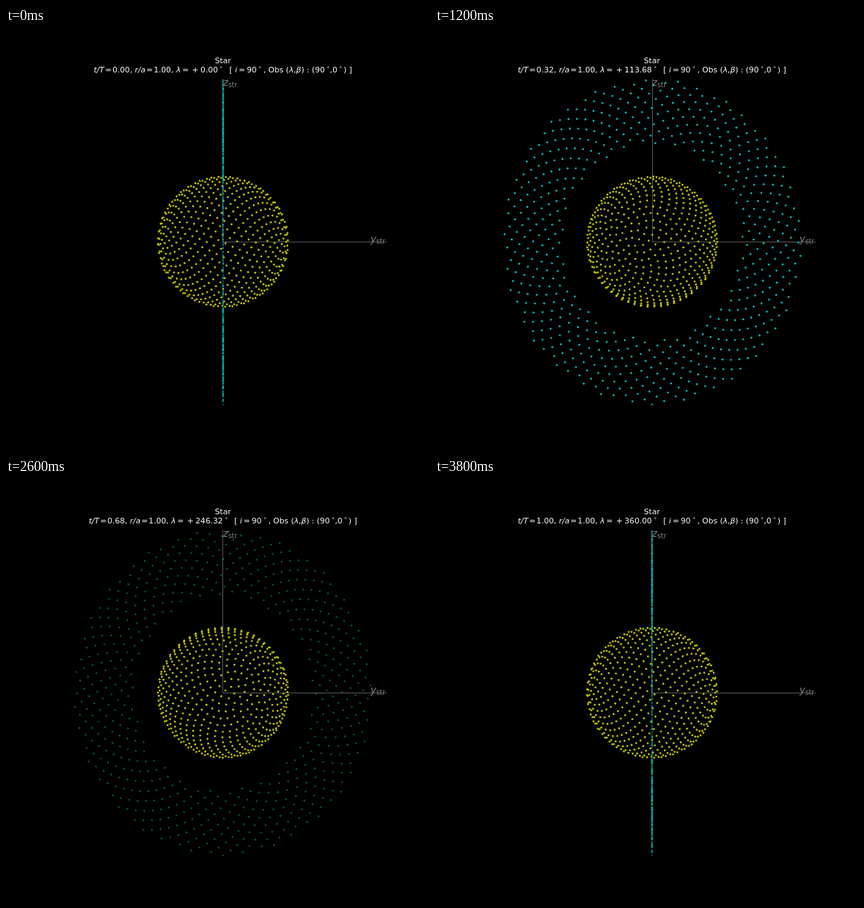
An HTML page for the animation above (4000 ms loop, 600 by 600 pixels).

```html
<!DOCTYPE html>
<html lang="en">
<head>
<meta charset="utf-8">
<title>Ringed star</title>
<style>
  html, body { margin: 0; width: 100%; height: 100%; overflow: hidden; background: #000; }
  svg { display: block; width: 600px; height: 600px; }
  text { font-family: "DejaVu Sans", sans-serif; white-space: pre; }
  .title { font-size: 11.11px; fill: #fff; text-anchor: middle; }
  .axis { font-size: 13.89px; fill: #808080; }
  .i { font-style: italic; }
  .sub { font-size: 9.72px; }
  .deg { font-size: 7.78px; }
  #star { fill: #bfbf00; }
  #ring { fill: #00bfbf; }
  #ring.dim { fill-opacity: 0.5; }
</style>
</head>
<body>
<svg viewBox="0 0 600 600">
  <rect width="600" height="600" fill="#000"/>
  <clipPath id="frame"><rect x="76" y="71.6" width="464" height="463.2"/></clipPath>
  <g stroke="#5a5a5a">
    <line x1="308" y1="303.5" x2="540" y2="303.5"/>
    <line id="vertical" y1="72" y2="303"/>
  </g>
  <text class="axis" x="308" y="82"><tspan class="i">z</tspan><tspan class="sub" dy="2">str</tspan></text>
  <text class="axis" x="517" y="304"><tspan class="i">y</tspan><tspan class="sub" dy="2">str</tspan></text>
  <g clip-path="url(#frame)">
    <g id="star"></g>
    <g id="ring"></g>
  </g>
  <text class="title" x="307.7" y="50">Star</text>
  <text class="title" id="status" x="307.7" y="63"></text>
</svg>
<script>
const STEP = 200, FRAMES = 20;
const CX = 307.9, CY = 303.2;
const OUTER = 231, INNER = 0.6 * OUTER, RADIUS = 0.4 * OUTER;
const STAR_POINTS = 1000, RING_POINTS = 600, DISK_POINTS = 937;
const GOLDEN = Math.PI * (3 - Math.sqrt(5));
const byId = id => document.getElementById(id);
const rad = degrees => degrees * Math.PI / 180;

// Body axes: h and z span the ring plane, n is its normal.
function polar(rho, angle, n) {
  return { h: rho * Math.cos(angle), z: rho * Math.sin(angle), n };
}

const ringPoints = Array.from({ length: RING_POINTS }, (_, k) =>
  polar(OUTER * Math.sqrt(1 - k / (DISK_POINTS - 0.5)), rad(-90) - GOLDEN * k, 0));

const starPoints = Array.from({ length: STAR_POINTS }, (_, k) => {
  const c = 1 - (2 * k + 1) / STAR_POINTS;
  return polar(RADIUS * Math.sqrt(1 - c * c), rad(82.7) - GOLDEN * k, RADIUS * c);
});

function project(points, sin, cos) {
  return points.map(({ h, z, n }) => ({
    y: h * sin + n * cos,
    z,
    depth: n * sin - h * cos
  }));
}

function coveredByRing(p, sin, cos) {
  if (Math.abs(sin) < 1e-6) return false;
  const h = p.y / sin;
  const rho = Math.hypot(h, p.z);
  return rho > INNER && rho < OUTER && -h * cos > p.depth;
}

const coveredByStar = p => p.depth < 0 && Math.hypot(p.y, p.z) < RADIUS;

const dots = (points, r) => points
  .map(p => `<circle cx="${(CX + p.y).toFixed(2)}" cy="${(CY - p.z).toFixed(2)}" r="${r}"/>`)
  .join("");

const italic = s => `<tspan class="i">${s}</tspan>`;
const gap = (em, s) => `<tspan dx="${(em * 11.11).toFixed(2)}">${s}</tspan>`;
const equals = (space, value) => gap(space, "=") + gap(space, value);
const degree = (space, after) =>
  `<tspan class="deg" dx="2.2" dy="-5">∘</tspan>` +
  `<tspan dx="${(space * 11.11).toFixed(2)}" dy="5">${after}</tspan>`;

function statusLine(phase) {
  return italic("t/T") + equals(0.1, phase.toFixed(2)) + ", " +
    italic("r/a") + equals(0.1, "1.00") + ", " +
    italic("λ") + gap(0.2, "=") + gap(0.4, "+") +
    gap(0.25, (360 * phase).toFixed(2)) + degree(0.5, " [ ") +
    italic("i") + equals(0.2, "90") + degree(0.2, ", Obs (") +
    italic("λ") + "," + italic("β") + ") : (90" +
    degree(0, ",0") + degree(0.15, ") ]");
}

function draw(frame) {
  const phase = frame / (FRAMES - 1);
  const sin = Math.sin(2 * Math.PI * phase), cos = Math.cos(2 * Math.PI * phase);
  const dim = sin < 1e-6;
  const ring = byId("ring"), vertical = byId("vertical");

  byId("star").innerHTML = dots(project(starPoints, sin, cos)
    .filter(p => p.depth > 0 && !coveredByRing(p, sin, cos)), 1.45);
  ring.innerHTML = dots(project(ringPoints, sin, cos)
    .filter(p => !coveredByStar(p)), dim ? 1.2 : 1.4);
  ring.classList.toggle("dim", dim);

  const x = dim ? 307.5 : 308.5;
  vertical.setAttribute("x1", x);
  vertical.setAttribute("x2", x);
  byId("status").innerHTML = statusLine(phase);
}

const start = performance.now();
let shown = -1;
function tick() {
  const frame = Math.floor((performance.now() - start) / STEP) % FRAMES;
  if (frame !== shown) draw(shown = frame);
  requestAnimationFrame(tick);
}
tick();
</script>
</body>
</html>
```
